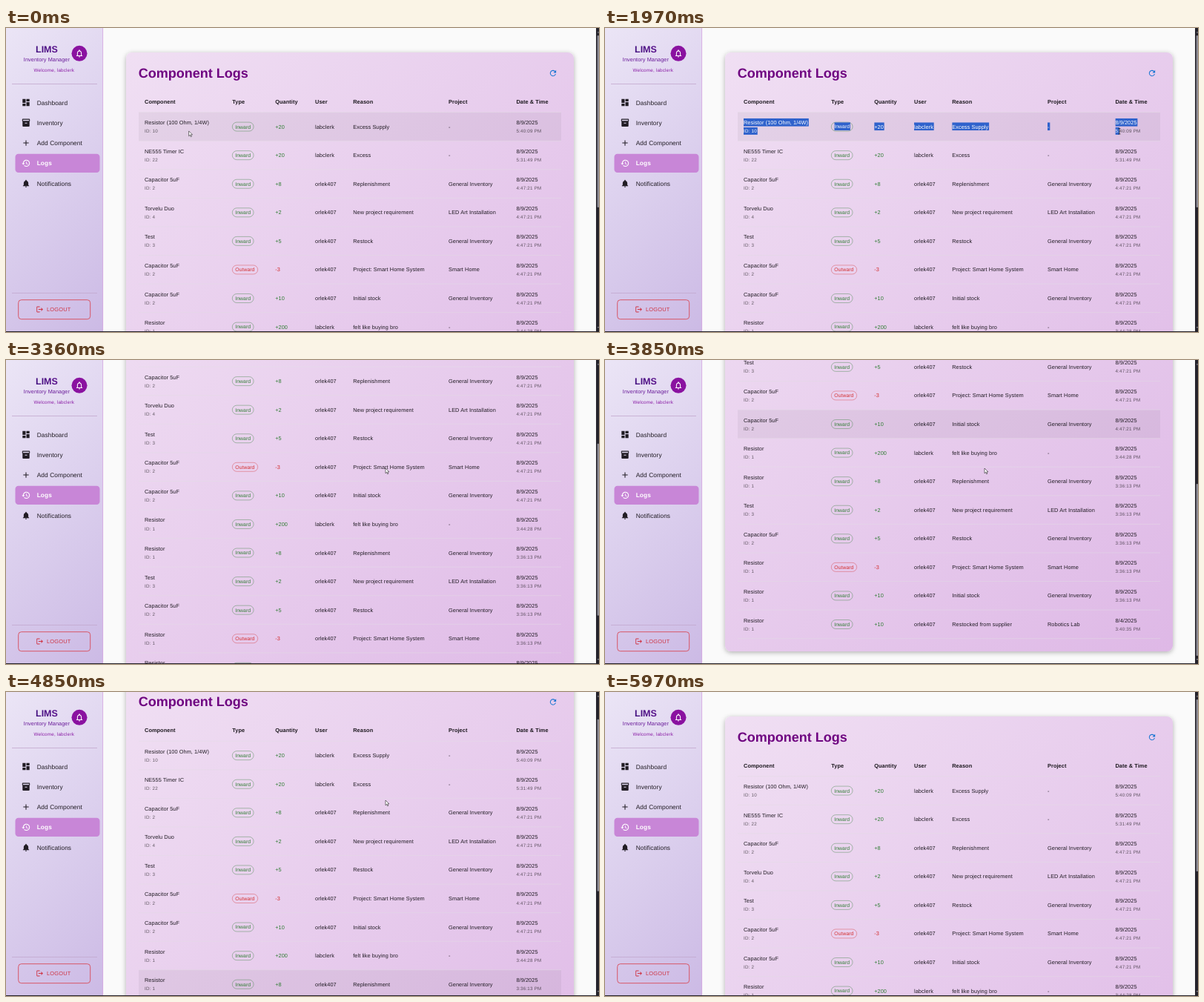
Write an HTML page that moves like this. It is 800x410 px and loops after 6 s.

```html
<!DOCTYPE html>
<html lang="en">
<head>
<meta charset="utf-8">
<title>Component Logs</title>
<style>
  html, body { margin: 0; width: 100%; height: 100%; overflow: hidden; background: #fafafa; }
  svg { display: block; }
  text { font-family: "Liberation Sans", Arial, sans-serif; white-space: pre; text-rendering: geometricPrecision; }
  .body { font-size: 7.33px; letter-spacing: .08px; fill: #211c24; }
  .small { font-size: 6.25px; letter-spacing: .21px; fill: #000; fill-opacity: .58; }
  .chip { font-size: 6.8px; letter-spacing: .06px; }
  .head { font-size: 7.35px; letter-spacing: .08px; font-weight: bold; fill: #1c181e; }
  .nav { font-size: 8.33px; letter-spacing: .08px; fill: #211c24; }
  .in { fill: #2e7d32; }
  .out { fill: #d32f2f; }
  .active { fill: #fff; font-weight: bold; }
  .sel text { fill: #fff; fill-opacity: 1; }
</style>
</head>
<body>
<svg id="stage" width="800" height="410" viewBox="0 0 800 410">
  <defs>
    <linearGradient id="cardFill" gradientUnits="userSpaceOnUse" x1="153.5" y1="41.5" x2="774.5" y2="662.5">
      <stop stop-color="#f0dff3"/><stop offset="1" stop-color="#deb8e6"/>
    </linearGradient>
    <linearGradient id="sideFill" gradientUnits="userSpaceOnUse" x1="-69.7" y1="69.8" x2="200.7" y2="340.2">
      <stop stop-color="#ebe5f6"/><stop offset="1" stop-color="#ccbae5"/>
    </linearGradient>
    <linearGradient id="brandFill">
      <stop stop-color="#43107f"/><stop offset="1" stop-color="#5a128c"/>
    </linearGradient>
    <filter id="shadow" x="-10%" y="-10%" width="120%" height="120%">
      <feDropShadow dx="0" dy="1.6" stdDeviation="3" flood-color="#000" flood-opacity=".3"/>
    </filter>
  </defs>
  <rect width="800" height="410" fill="#fafafa"/>
  <g id="page">
    <rect x="162" y="33" width="604" height="638" rx="8" fill="url(#cardFill)" filter="url(#shadow)"/>
    <rect id="hover" x="179" width="570" height="38.57" fill="#000" fill-opacity=".048"/>
  </g>
  <g id="sidebar">
    <rect width="131" height="410" fill="url(#sideFill)"/>
    <path d="M130.6 0V410" stroke="#d5a6e0" stroke-width=".8"/>
    <path d="M8 75.5H123M8 357.5H123" stroke="#c3a9cf" stroke-width=".8"/>
    <circle cx="99" cy="34.3" r="10.5" fill="#8a12a0"/>
    <rect x="12.5" y="169.8" width="114" height="25.2" rx="4.2" fill="#c886d7"/>
    <rect x="16.7" y="366.7" width="97" height="26" rx="4" fill="none" stroke="#d94b58" stroke-width=".9"/>
  </g>
  <rect x="796" width="4" height="410" fill="#25232b"/>
  <rect id="thumb" x="797.6" width="2.4" height="232" rx="1" fill="#8d8c96"/>
  <path d="M797.8 6.5L799 4.5L800 6.5ZM797.8 403L799 405L800 403Z" fill="#8d8c96"/>
  <rect y="409" width="800" height="1" fill="#25232b"/>
  <g id="pointer">
    <path id="arrow" d="M0 0V6.8L1.6 5.3L2.7 7.8L3.8 7.3L2.7 4.9H4.9Z" fill="#fff" stroke="#222" stroke-width=".6"/>
    <path id="beam" d="M-1.5 -3.5H1.5M0 -3.5V4M-1.5 4H1.5" fill="none" stroke="#222" stroke-width=".7"/>
  </g>
</svg>
<script>
const LOOP = 6000, ROW_TOP = 113.7, ROW_H = 38.57;
const COL = { name: 187, type: 305.3, qty: 363.2, user: 417, reason: 468.2, project: 597, date: 688.4 };
const GUEST = "labclerk", STAFF = "orlek407";
const $ = id => document.getElementById(id);
const page = $("page"), sidebar = $("sidebar");

function add(parent, tag, attrs, content) {
  const el = document.createElementNS("http://www.w3.org/2000/svg", tag);
  for (const key in attrs) el.setAttribute(key, attrs[key]);
  if (content) el.textContent = content;
  parent.appendChild(el);
  return el;
}
const label = (parent, x, y, cls, content, extra) => add(parent, "text", { x, y, class: cls, ...extra }, content);
// Icons are drawn on a 24 unit grid around their centre.
const icon = (parent, cx, cy, size, fill, d) => add(parent, "path",
  { d, fill, transform: `translate(${cx} ${cy}) scale(${size / 24}) translate(-12 -12)` });

const BELL = "M12 22c1.1 0 2-.9 2-2h-4c0 1.1.9 2 2 2zm6-6v-5c0-3-1.6-5.6-4.5-6.3V4a1.5 1.5 0 0 0-3 0v.7C7.6 5.4 6 8 6 11v5l-2 2v1h16v-1z";
const BELL_HOLE = "M16 17H8v-6c0-2.5 1.5-4.5 4-4.5s4 2 4 4.5z";
const NAV = [
  ["Dashboard", "M3 13h8V3H3zm0 8h8v-6H3zm10 0h8V11h-8zm0-18v6h8V3z"],
  ["Inventory", "M20 2H4c-1 0-2 .9-2 2v3c0 .7.4 1.3 1 1.7V20c0 1.1 1.1 2 2 2h14c.9 0 2-.9 2-2V8.7c.6-.4 1-1 1-1.7V4c0-1.1-1-2-2-2zm-5 12H9v-2h6zm5-7H4V4h16z"],
  ["Add Component", "M19 13h-6v6h-2v-6H5v-2h6V5h2v6h6z"],
  ["Logs", "M13 3c-5 0-9 4-9 9H1l4 4 4-4H6a7 7 0 1 1 2 5l-1.4 1.4A9 9 0 1 0 13 3zm-1 5v5l4.3 2.5.7-1.2-3.5-2V8z"],
  ["Notifications", BELL]
];
const REFRESH = "M17.65 6.35A8 8 0 1 0 19.7 14h-2.1A6 6 0 1 1 16.2 7.8L13 11h7V4z";
const LOGOUT = "M17 7l-1.4 1.4L18.2 11H8v2h10.2l-2.6 2.6L17 17l5-5zM4 5h8V3H4c-1.1 0-2 .9-2 2v14c0 1.1.9 2 2 2h8v-2H4z";

function buildSidebar() {
  label(sidebar, 40, 33, "", "LIMS", { "font-size": 12.5, "font-weight": "bold", fill: "url(#brandFill)" });
  label(sidebar, 23.8, 45, "", "Inventory Manager", { "font-size": 7.3, "letter-spacing": .08, fill: "#6a1b9a" });
  label(sidebar, 37.5, 59.2, "", "Welcome, " + GUEST, { "font-size": 6.25, "letter-spacing": .21, fill: "#8a1ba5" });
  icon(sidebar, 99, 34.3, 12.5, "#fff", BELL + BELL_HOLE).setAttribute("fill-rule", "evenodd");
  NAV.forEach(([title, d], i) => {
    const y = 100.5 + i * 27.3, active = title === "Logs";
    icon(sidebar, 27, y, 12.5, active ? "#fff" : "#211c24", d);
    label(sidebar, 41.7, y + 3, active ? "nav active" : "nav", title);
  });
  icon(sidebar, 45.6, 379.5, 10.4, "#cf3342", LOGOUT);
  label(sidebar, 55, 382.2, "", "LOGOUT", { "font-size": 7.4, "letter-spacing": .21, fill: "#cf3342" });
}

const BATCH = [
  ["+8", "Replenishment", "General Inventory"],
  ["+2", "New project requirement", "LED Art Installation"],
  ["+5", "Restock", "General Inventory"],
  ["-3", "Project: Smart Home System", "Smart Home"],
  ["+10", "Initial stock", "General Inventory"]
];
const batch = (parts, time) => BATCH.map(([qty, reason, project], i) =>
  [...parts[i].split("|"), qty, STAFF, reason, project, time]);
const ROWS = [
  ["Resistor (100 Ohm, 1/4W)", "10", "+20", GUEST, "Excess Supply", "-", "5:40:09 PM"],
  ["NE555 Timer IC", "22", "+20", GUEST, "Excess", "-", "5:31:49 PM"],
  ...batch(["Capacitor 5uF|2", "Torvelu Duo|4", "Test|3", "Capacitor 5uF|2", "Capacitor 5uF|2"], "4:47:21 PM"),
  ["Resistor", "1", "+200", GUEST, "felt like buying bro", "-", "3:44:28 PM"],
  ...batch(["Resistor|1", "Test|3", "Capacitor 5uF|2", "Resistor|1", "Resistor|1"], "3:36:13 PM"),
  ["Resistor", "1", "+10", STAFF, "Restocked from supplier", "Robotics Lab", "3:40:35 PM", "8/4/2025"]
];

function buildTable() {
  label(page, 178.8, 66.8, "", "Component Logs", { "font-size": 18, "font-weight": "bold", fill: "#6f0581" });
  icon(page, 738, 61, 12.5, "#1976d2", REFRESH);
  ["Component", "Type", "Quantity", "User", "Reason", "Project", "Date & Time"].forEach((title, i) =>
    label(page, Object.values(COL)[i], 101.6, "head", title));
  const line = y => add(page, "path", { d: `M179 ${y}H749`, stroke: "#e0dbe2", "stroke-width": .5 });
  line(ROW_TOP);
  ROWS.forEach(([name, id, qty, user, reason, project, time, date = "8/9/2025"], i) => {
    const top = ROW_TOP + i * ROW_H, mid = top + 21.9, outward = qty[0] === "-";
    const color = outward ? "#d32f2f" : "#2e7d32";
    line(top + ROW_H);
    label(page, COL.name, top + 16.4, "body", name);
    label(page, COL.name, top + 27.5, "small", "ID: " + id);
    add(page, "rect", { x: COL.type, y: top + 13.4, width: outward ? 34.4 : 28.8, height: 12, rx: 6,
      fill: "none", stroke: color, "stroke-opacity": .7, "stroke-width": .55 });
    label(page, COL.type + 4, top + 21.8, outward ? "chip out" : "chip in", outward ? "Outward" : "Inward");
    label(page, COL.qty, mid, "body", qty, { style: `fill:${color}` });
    label(page, COL.user, mid, "body", user);
    label(page, COL.reason, mid, "body", reason);
    label(page, COL.project, mid, "body", project);
    label(page, COL.date, top + 16.4, "body", date);
    label(page, COL.date, top + 27.5, "small", time);
  });
}

// Spans grow with the drag, or appear whole once it passes "wholeAt"; nested svgs clip them.
const spans = [];
function buildSelection() {
  const group = add(page, "g", { class: "sel" });
  const span = (x, baseline, cls, content, wholeAt) => {
    const small = cls === "small", height = small ? 10 : 11, rise = small ? 7.3 : 8.3;
    const box = add(group, "svg", { x, y: baseline - rise, width: 0, height, overflow: "hidden" });
    add(box, "rect", { width: 200, height, fill: "#2f62cc" });
    const text = label(box, 0, rise, cls, content);
    spans.push({ box, x, wholeAt, full: text.getComputedTextLength() + .8 });
  };
  const [name, id, qty, user, reason, project, time] = ROWS[0];
  const upper = ROW_TOP + 16.4, lower = ROW_TOP + 27.5, mid = ROW_TOP + 21.9;
  span(COL.name, upper, "body", name);
  span(COL.name, lower, "small", "ID: " + id, 215);
  span(COL.type + 4, mid - .1, "chip", "Inward");
  span(COL.qty, mid, "body", qty, 376);
  span(COL.user, mid, "body", user);
  span(COL.reason, mid, "body", reason);
  span(COL.project, mid, "body", project);
  span(COL.date, upper, "body", "8/9/2025", 689);
  span(COL.date, lower, "small", time);
}

const linear = p => p;
const smooth = p => p * p * (3 - 2 * p);
function track(keys, t, ease, axis = 1) {
  const next = keys.findIndex(k => k[0] > t);
  if (next < 0) return keys[keys.length - 1][axis];
  if (next === 0) return keys[0][axis];
  const a = keys[next - 1], b = keys[next];
  return a[axis] + (b[axis] - a[axis]) * ease((t - a[0]) / (b[0] - a[0]));
}

const SCROLL = [[3190, 0], [3410, 208], [3620, 208], [3830, 278], [4545, 278], [4960, 0]];
const POINTER = [[0, 246.8, 139], [330, 187, 127], [430, 187, 127], [880, 371, 147.3], [1750, 694, 139],
  [2450, 694, 139], [3050, 512, 146], [5090, 512, 146], [5400, 512, -14]];
// The hovered row only refreshes once scrolling settles.
const HOVER = [[0, 0], [3500, 6], [3930, 8], [5010, 0], [5170, -1]];

const show = (id, on) => $(id).setAttribute("visibility", on ? "visible" : "hidden");

function draw(t) {
  const scroll = track(SCROLL, t, smooth);
  const x = track(POINTER, t, linear), y = track(POINTER, t, linear, 2);
  const row = HOVER.filter(k => k[0] <= t).pop()[1];
  const selecting = t > 430 && t < 2440;
  const overText = (t > 300 && t < 500) || (t > 1730 && t < 2500);

  page.setAttribute("transform", `translate(0 ${-scroll})`);
  $("thumb").setAttribute("y", 10 + scroll * .565);
  $("hover").setAttribute("y", ROW_TOP + row * ROW_H);
  show("hover", row >= 0);
  for (const { box, x: left, wholeAt, full } of spans) {
    const reach = wholeAt ? (x > wholeAt ? full : 0) : Math.max(0, Math.min(full, x - left));
    box.setAttribute("width", selecting ? reach : 0);
  }
  $("pointer").setAttribute("transform", `translate(${x} ${y})`);
  show("arrow", !overText);
  show("beam", overText);
}

buildSidebar();
buildTable();
buildSelection();

const start = performance.now();
function frame() {
  draw((performance.now() - start) % LOOP);
  requestAnimationFrame(frame);
}
draw(0);
requestAnimationFrame(frame);
</script>
</body>
</html>
```
